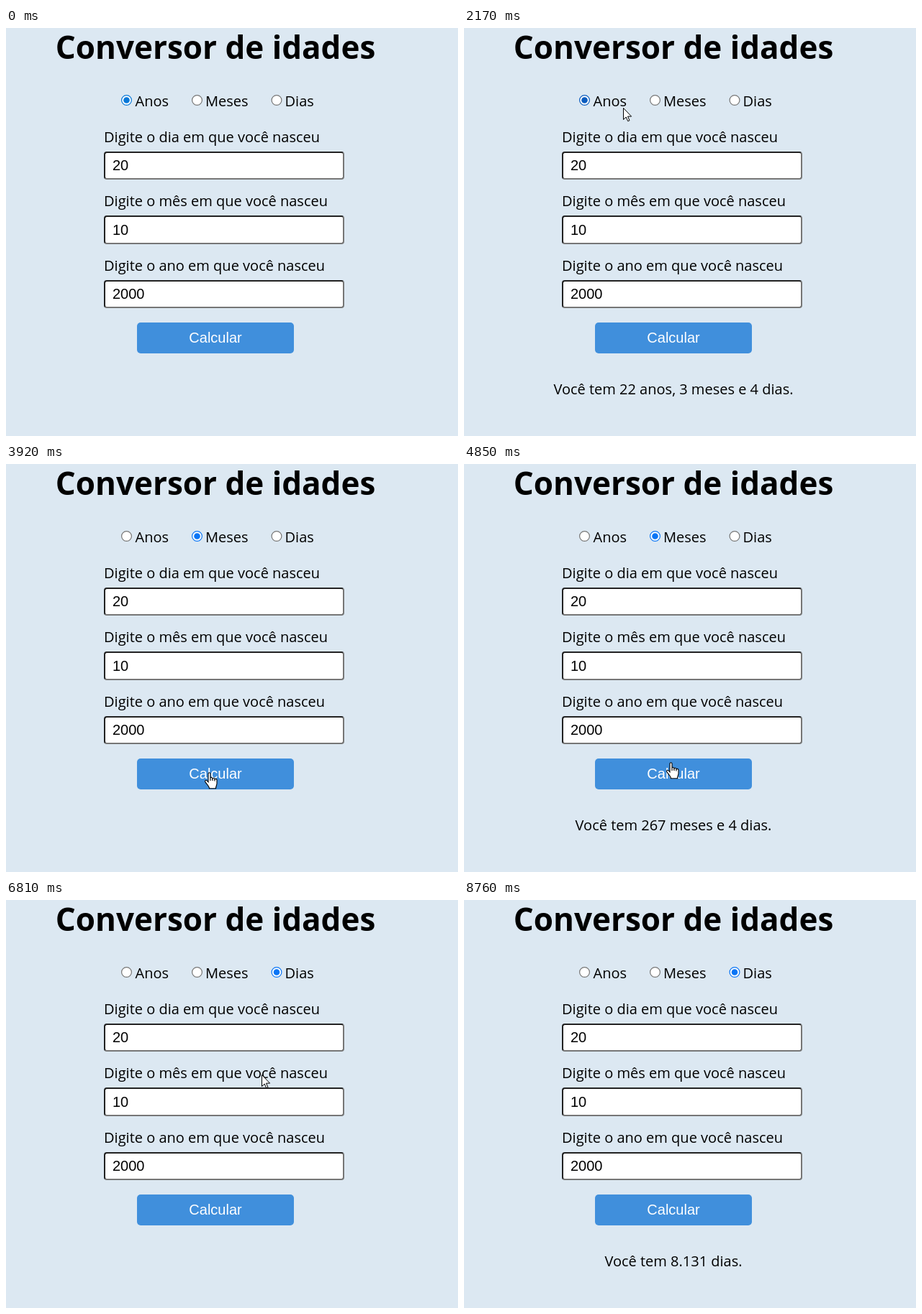
An HTML page for the animation above (9.49 s loop, 628 px wide and 568 px high).

```html
<!DOCTYPE html>
<html lang="pt-BR">
<head>
<meta charset="utf-8">
<title>Conversor de idades</title>
<style>
html, body { margin: 0; width: 100%; height: 100%; overflow: hidden; background: #dce8f2; }
.field { position: absolute; left: 136px; width: 334px; box-sizing: border-box; background: #fff;
  border: 2px solid; border-color: #222 #767676 #767676 #222; border-radius: 4px; }
svg { position: absolute; left: 0; top: 0; }
text { font: 20px "Open Sans", sans-serif; }
.title { font-weight: 700; font-size: 44px; }
.ui { font-family: "Liberation Sans", Arial, sans-serif; }
.mid { text-anchor: middle; }
</style>
</head>
<body>
<div id="fields"></div>
<svg width="628" height="568" viewBox="0 0 628 568">
  <text class="title mid" x="291" y="43">Conversor de idades</text>
  <g id="radios"></g>
  <g id="labels"></g>
  <rect x="182" y="410" width="218" height="43" rx="5" fill="#408fdc"/>
  <text class="ui mid" x="291" y="438" fill="#fff">Calcular</text>
  <text class="mid" id="result" x="291" y="510"></text>
  <g id="cursor">
    <path id="arrow" d="M.5.5V16.5L4.2 13L6.7 18.7L9 17.7L6.5 12.1H11.6Z" fill="#fff" stroke="#000"/>
    <g id="hand" transform="translate(-6 0)" fill="#fff" stroke="#000" stroke-width="1.1">
      <path d="M5 2.2C5 .2 8 .2 8 2.2V8C8.5 7 11 7.2 11 8.8C11.5 7.9 14 8.1 14 9.7C14.5 8.9 17 9.2 17 11V15.5C17 18.5 15.5 19 15.5 22.8H6.5C6.5 19.5 2 16 .7 13.2C0 11.5 2 10.6 3.3 12L5 13.8Z"/>
      <path d="M8 8V12M11 8.8V12M14 9.7V12.5" fill="none"/>
    </g>
    <path id="beam" d="M-3-8.5H-1L0-7.5L1-8.5H3M0-7.5V7.5M-3 8.5H-1L0 7.5L1 8.5H3" fill="none" stroke="#000"/>
  </g>
  <circle id="click" r="15" fill="#ff0" fill-opacity=".5"/>
</svg>
<script>
const LOOP = 9490;
const $ = id => document.getElementById(id);

const radios = [
  { name: 'Anos', x: 160, right: 226, blue: '#0878d8' },
  { name: 'Meses', x: 258, right: 337, blue: '#0a75f5' },
  { name: 'Dias', x: 368.5, right: 429, blue: '#0a75f5' }
];
const fields = [
  { name: 'dia', value: 20, y: 172, h: 39 },
  { name: 'mês', value: 10, y: 261, h: 40 },
  { name: 'ano', value: 2000, y: 351, h: 39 }
];

const smooth = p => .8 * p * p * (3 - 2 * p) + .2 * p;
const easeOut = p => p * (2 - p);
const easeIn = p => p * p;

// first step, last step, number of steps, from x y, to x y, easing
const moves = [
  [360, 1010, 10, 558, 590, 328, 427, easeOut],
  [1660, 2200, 8, 328, 427, 214, 91, smooth],
  [2270, 2540, 5, 214, 91, 268, 107, smooth],
  [2610, 2680, 2, 268, 107, 268, 102, smooth],
  [3480, 3920, 7, 268, 102, 282, 429, smooth],
  [4850, 5510, 10, 282, 429, 393, 105, smooth],
  [5660, 5660, 1, 393, 105, 393, 104, smooth],
  [6590, 7170, 9, 393, 104, 304, 433, smooth],
  [8400, 8760, 6, 304, 433, 514, 613, easeIn]
];
const clicks = [[1230, 1380], [2760, 2980], [4200, 4420], [5940, 6160], [7390, 7610]];
const results = [
  [0, ''], [1380, 'Você tem 22 anos, 3 meses e 4 dias.'],
  [2980, ''], [4420, 'Você tem 267 meses e 4 dias.'],
  [6160, ''], [7610, 'Você tem 8.131 dias.']
];
const choices = [[0, 0], [2980, 1], [6160, 2]];

$('fields').innerHTML = fields.map(f =>
  `<div class="field" style="top:${f.y}px;height:${f.h}px"></div>`).join('');
$('labels').innerHTML = fields.map(f => {
  const c = f.y + 19.5;
  return `<text x="136" y="${f.y - 13}">Digite o ${f.name} em que você nasceu</text>
    <text class="ui" x="148" y="${f.y + f.h - 13}">${f.value}</text>
    <path class="spin" d="M447.5 ${c - 3}h6l-3-4zM447.5 ${c + 3}h6l-3 4z" fill="#505050"/>`;
}).join('');
$('radios').innerHTML = radios.map(r =>
  `<circle class="ring" cx="${r.x + 7.5}" cy="100.5" r="6.9" fill="#fff" stroke-width="1.2"/>
   <circle class="dot" cx="${r.x + 7.5}" cy="100.5" r="4.3"/>
   <text x="${r.x + (r.name === 'Anos' ? 19.5 : 19)}" y="109">${r.name}</text>`).join('');

const rings = document.querySelectorAll('.ring');
const dots = document.querySelectorAll('.dot');
const spins = document.querySelectorAll('.spin');

const show = (el, on) => el.setAttribute('visibility', on ? 'visible' : 'hidden');
const latest = (list, t) => list.filter(e => e[0] <= t).pop();
const inside = ([x, y], l, t, r, b) => x >= l && x < r && y >= t && y < b;

function pointer(t) {
  const move = latest(moves, t);
  if (!move) return [-99, -99];
  const [t0, t1, n, x0, y0, x1, y1, ease] = move;
  const gap = (t1 - t0) / (n - 1 || 1) || 1;
  const k = Math.min(n - 1, Math.floor((t - t0) / gap + 1e-6));
  const p = ease((k + 1) / n);
  return [Math.round(x0 + (x1 - x0) * p), Math.round(y0 + (y1 - y0) * p)];
}

function draw(t) {
  const at = pointer(t);
  const place = `translate(${at})`;
  const chosen = latest(choices, t)[1];
  let shape = inside(at, 182, 410, 400, 453) ? 'hand' : 'arrow';

  fields.forEach((f, i) => {
    const over = inside(at, 136, f.y, 470, f.y + f.h);
    if (over) shape = 'beam';
    show(spins[i], over);
  });
  radios.forEach((r, i) => {
    const over = inside(at, r.x, 88, r.right, 116);
    const on = i === chosen;
    const blue = over ? '#0b5cbf' : r.blue;
    rings[i].setAttribute('stroke', on ? blue : over ? '#4f4f4f' : '#767676');
    dots[i].setAttribute('fill', blue);
    show(dots[i], on);
  });

  $('result').textContent = latest(results, t)[1];
  for (const id of ['arrow', 'hand', 'beam']) show($(id), id === shape);
  $('cursor').setAttribute('transform', place);
  $('click').setAttribute('transform', place);
  show($('click'), clicks.some(([a, b]) => t >= a && t < b));
}

const start = performance.now();
function tick() {
  draw((performance.now() - start) % LOOP);
  requestAnimationFrame(tick);
}
tick();
</script>
</body>
</html>
```
